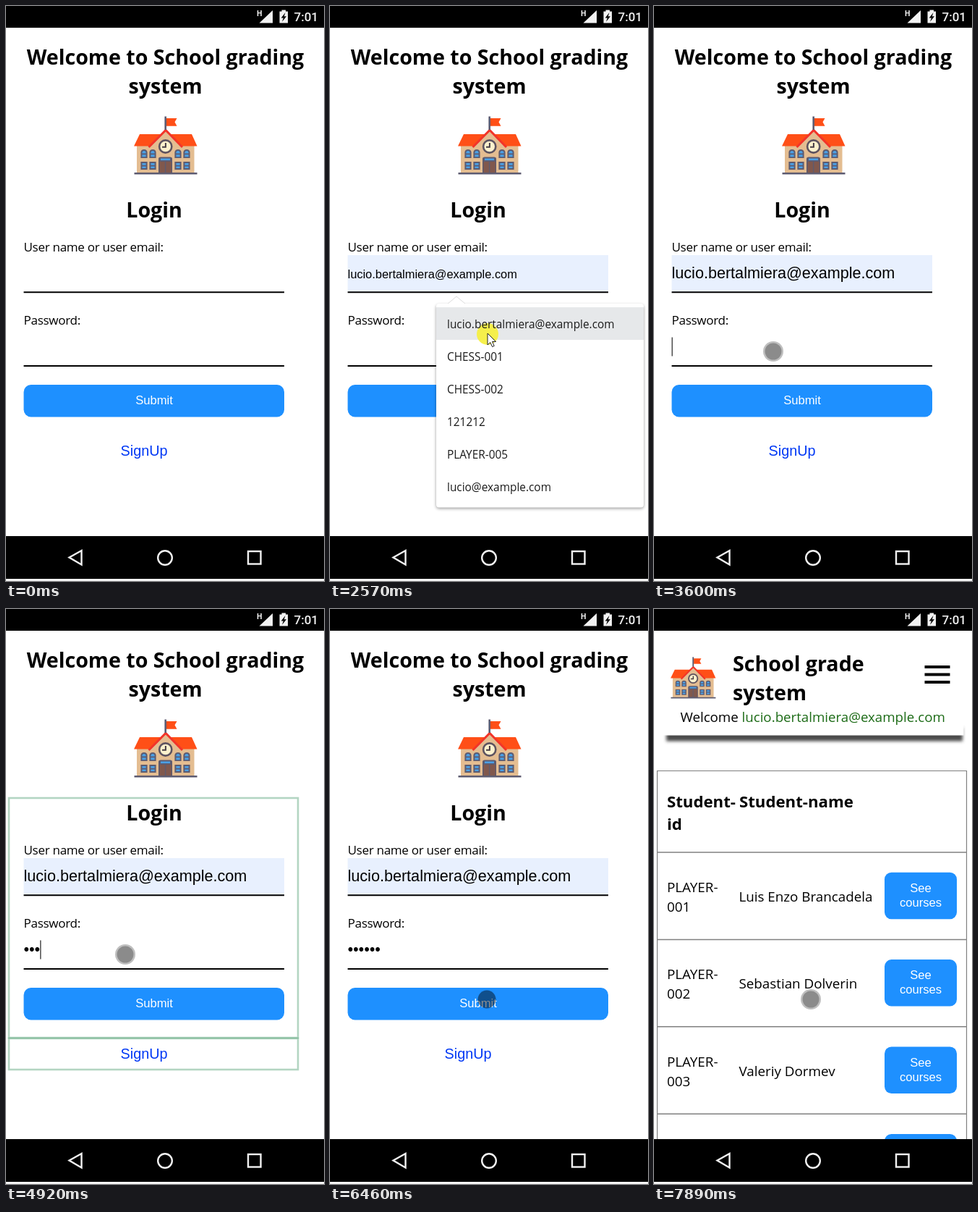
Animation, 440 px wide and 794 px high, one loop 8 s. Source, as an HTML page:

```html
<!DOCTYPE html>
<html lang="en">
<head>
<meta charset="utf-8">
<title>School grading login</title>
<style>
  html, body { margin: 0; width: 100%; height: 100%; overflow: hidden; background: #fff; }
  svg { display: block; width: 440px; height: 794px; }
  text { white-space: pre; }
  .ui { font-family: "Open Sans", "Noto Sans", sans-serif; fill: #000; }
  .bold { font-weight: 700; font-size: 28.6px; }
  .mid { text-anchor: middle; }
  .label { font-size: 17px; letter-spacing: -.28px; }
  .item { font-size: 15.4px; fill: #1b1b1b; }
  .cell { font-size: 18.8px; }
  .arial { font-family: "Liberation Sans", Arial, sans-serif; }
  .btn { font-size: 16.6px; fill: #fff; text-anchor: middle; }
  .flash rect { fill: none; stroke: #2e8b57; stroke-width: 2.6; stroke-opacity: .36; }
</style>
</head>
<body>
<svg viewBox="0 0 440 794" xmlns="http://www.w3.org/2000/svg">
  <defs>
    <filter id="soft" x="-10%" y="-60%" width="120%" height="240%"><feGaussianBlur stdDeviation="2.3"/></filter>
    <filter id="haze" x="-5%" y="-5%" width="110%" height="110%"><feGaussianBlur stdDeviation="2"/></filter>
    <g id="pane">
      <path d="M-4.6 6V-1.5Q-4.6 -6 0 -6T4.6 -1.5V6Z" fill="#5d5b70"/>
      <path d="M-2.6 -.6V-1.5Q-2.6 -4 0 -4T2.6 -1.5V-.6ZM-2.6 1.2H2.6V4.2H-2.6Z" fill="#4aa0e6"/>
    </g>
    <g id="pane2">
      <rect x="-4.6" y="-5.5" width="9.2" height="11" fill="#5d5b70"/>
      <path d="M-2.6 -3.5H2.6V-.7H-2.6ZM-2.6 1H2.6V3.6H-2.6Z" fill="#4aa0e6"/>
    </g>
    <g id="school">
      <rect x="181" y="190" width="79.500" height="41" fill="#e4bd91"/>
      <path d="M185 177H257L264.500 193.500H177Z" fill="#ff4f17"/>
      <path d="M198 195L221 172L243.500 195Z" fill="#e4bd91"/>
      <path d="M197.500 195L221 171.500L244 195" fill="none" stroke="#f2352a" stroke-width="3"/>
      <path d="M220.700 152.500V171" stroke="#5d5b70" stroke-width="2.600"/>
      <path d="M222 155H236.500L233.500 160.300L236.500 165.700H222Z" fill="#ff4f17"/>
      <circle cx="220.700" cy="194" r="8.600" fill="#fdf1cd" stroke="#5d5360" stroke-width="2.600"/>
      <path d="M220.900 189V194.800H216" fill="none" stroke="#453c46" stroke-width="2"/>
      <g id="panes"></g>
      <path d="M211 231V211Q211 208.500 214 208.500H227Q230 208.500 230 211V231Z" fill="#5d5b70"/>
      <rect x="214" y="210.500" width="13" height="2.600" fill="#4aa0e6"/>
      <path d="M212.500 215H219.900V230H212.500ZM221.300 215H228.700V230H221.300Z" fill="#80584d"/>
      <path d="M177.500 231.300H264.500" stroke="#5d5b70" stroke-width="2.400"/>
    </g>
  </defs>

  <rect width="440" height="794" fill="#fff"/>

  <g id="login">
    <text class="ui bold mid" x="220.500" y="81">Welcome to School grading</text>
    <text class="ui bold mid" x="220.500" y="121">system</text>
    <use href="#school"/>
    <text class="ui bold mid" x="205" y="292">Login</text>
    <text class="ui label" x="24.500" y="339">User name or user email:</text>
    <text class="ui label" x="24.500" y="440">Password:</text>
    <rect id="fill" x="24.500" y="344" width="360.500" height="50" fill="#e8f0fe"/>
    <text id="email" class="arial" x="24.500" y="376"></text>
    <text id="dots" class="arial" x="24.500" y="477" font-size="21.600"></text>
    <path d="M24.500 395.300H385M24.500 497H385" stroke="#000" stroke-width="2"/>
    <rect id="caret" width="1.300" height="26" fill="#333"/>
    <rect x="24.500" y="523" width="360.500" height="44.500" rx="10" fill="#1e90ff"/>
    <text class="arial btn" x="205" y="550">Submit</text>
    <text class="arial mid" x="191" y="621" font-size="19.800" fill="#0038f5">SignUp</text>
    <g id="formFlash" class="flash">
      <rect x="4" y="261" width="400" height="331"/>
      <rect x="4" y="593" width="400" height="43"/>
    </g>
    <g id="popup">
      <rect x="147" y="413" width="287" height="281" rx="4" fill="#000" opacity=".4" filter="url(#haze)"/>
      <path d="M162 412L175 401L188 412" fill="#fff" stroke="#dcdcdc"/>
      <rect x="147" y="411" width="287" height="281.500" rx="4" fill="#fff"/>
      <rect id="hover" x="147" y="416" width="287" height="45" fill="#e6e8ea"/>
      <circle id="halo" r="15" fill="#f6f03a" opacity=".9"/>
      <g id="items"></g>
    </g>
    <path id="arrow" d="M0 0V16L3.800 12.500L6.600 18.600L9.200 17.400L6.500 11.500H11.500Z" fill="#fff" stroke="#222" stroke-width="1"/>
  </g>

  <g id="home">
    <rect x="17" y="164" width="410" height="18.500" fill="#4c4c4c" filter="url(#soft)"/>
    <rect x="10.500" y="58" width="418" height="116.500" fill="#fff"/>
    <use href="#school" transform="translate(23 66) scale(.713) translate(-177 -152)"/>
    <text class="ui bold" x="109" y="86">School grade</text>
    <text class="ui bold" x="109" y="126">system</text>
    <path d="M374.500 80H409.500M374.500 90.500H409.500M374.500 101H409.500" stroke="#000" stroke-width="4.200"/>
    <text class="ui" x="36.500" y="156" font-size="18.700">Welcome <tspan id="who" fill="#1c6b16"></tspan></text>
    <g id="table">
      <text class="ui bold" x="18" y="274" style="font-size:22.200px">Student-</text>
      <text class="ui bold" x="18" y="305" style="font-size:22.200px">id</text>
      <text class="ui bold" x="118" y="274" style="font-size:22.200px">Student-name</text>
      <g id="rows"></g>
      <path d="M4.500 740V223.500H432.500V740" fill="none" stroke="#808080" stroke-width="1.200"/>
    </g>
    <g id="tableFlash" class="flash"><rect x="4" y="223" width="428" height="530"/></g>
  </g>

  <g id="touch">
    <circle id="ring" r="14" fill="#000" opacity=".25"/>
    <circle id="core" r="11.500" fill="#000"/>
  </g>

  <rect width="440" height="30" fill="#000"/>
  <g fill="#f2f2f2">
    <path d="M369 6V23.500H350.500Z"/>
    <text x="347" y="14" font-family="Roboto, sans-serif" font-weight="700" font-size="10.500">H</text>
    <path d="M381.500 5.500H387V7.500H390V23.500H378.500V7.500H381.500Z"/>
    <path d="M386.500 9L380.700 16.500H383.800L382 21.800L388 14.200H384.800Z" fill="#000"/>
    <text x="398.500" y="21" font-family="Roboto, sans-serif" font-weight="500" font-size="17">7:01</text>
  </g>
  <rect y="732" width="440" height="59" fill="#000"/>
  <rect y="791" width="440" height="3" fill="#f6f6f6"/>
  <g fill="none" stroke="#f2f2f2" stroke-width="2.400">
    <path d="M87.500 761.500L104.500 752V771.500Z"/>
    <circle cx="220" cy="762" r="9.800"/>
    <rect x="335" y="753" width="17.500" height="17.500"/>
  </g>
</svg>
<script>
const LOOP = 8000;
const EMAIL = "lucio.bertalmiera@example.com";
const $ = id => document.getElementById(id);

const uses = [191, 203, 238, 250].map(x =>
  `<use href="#pane" x="${x}" y="204"/><use href="#pane2" x="${x}" y="220.500"/>`);
$("panes").innerHTML = uses.join("");

$("items").innerHTML = [EMAIL, "CHESS-001", "CHESS-002", "121212", "PLAYER-005", "lucio@example.com"]
  .map((s, i) => `<text class="ui item" x="162" y="${445 + 45 * i}">${s}</text>`).join("");

$("rows").innerHTML = ["Luis Enzo Brancadela", "Sebastian Dolverin", "Valeriy Dormev", ""]
  .map((name, i) => `<g transform="translate(0 ${120.4 * i})">
    <path d="M4 336H433" stroke="#808080" stroke-width="1.500"/>
    <text class="ui cell" x="18" y="391">PLAYER-</text>
    <text class="ui cell" x="18" y="418">00${i + 1}</text>
    <text class="ui cell" x="117.500" y="404">${name}</text>
    <rect x="319" y="363.700" width="100" height="64.500" rx="9.500" fill="#1e90ff"/>
    <text class="arial btn" x="369" y="391">See</text>
    <text class="arial btn" x="369" y="411">courses</text></g>`).join("");
$("who").textContent = EMAIL;

// Keys are [time, x, y]; positions between them are linear.
const touchPath = [
  [580, 253, 233], [800, 203, 275], [1000, 142, 325], [1120, 130, 352], [1320, 156, 384],
  [1639, 156, 384], [1640, 147, 395], [2900, 206, 455], [3270, 178, 462],
  [3470, 172, 468], [3600, 165, 477], [5860, 165, 477], [6190, 217, 539]
];
const mousePath = [[1850, 150, 398], [2040, 166, 402], [2230, 182, 414], [2570, 218, 453]];
const typed = [4390, 4590, 4920, 5130, 5390, 5650];

function along(path, t) {
  if (t <= path[0][0]) return path[0].slice(1);
  for (let i = 1; i < path.length; i++) {
    const [t1, x1, y1] = path[i];
    if (t < t1) {
      const [t0, x0, y0] = path[i - 1];
      const k = (t - t0) / (t1 - t0);
      return [x0 + (x1 - x0) * k, y0 + (y1 - y0) * k];
    }
  }
  return path[path.length - 1].slice(1);
}

const within = (t, a, b) => t >= a && t < b;
const show = (id, on) => $(id).setAttribute("display", on ? "inline" : "none");
const move = (id, [x, y]) => $(id).setAttribute("transform", `translate(${x} ${y})`);
const fade = (t, a, b) => Math.max(0, Math.min(1, (b - t) / (b - a)));

function caretAt(t, count) {
  if (within(t, 1850, 2230)) return [24.5, 356];
  if (within(t, 2900, 3470)) return [334.5, 356];
  if (within(t, 3470, 4060) || within(t, 4390, 6190)) return [24.5 + count * 7.56, 457.5];
  return null;
}

function draw(t) {
  const home = t >= 7010;
  show("login", !home);
  show("home", home);

  const popup = within(t, 1850, 2900);
  const mouse = along(mousePath, t);
  show("popup", popup);
  show("arrow", popup);
  show("hover", t >= 2230);
  move("halo", mouse);
  move("arrow", [mouse[0], mouse[1] - 1]);

  show("fill", t >= 2230);
  $("email").textContent = t >= 2230 ? EMAIL : "";
  $("email").setAttribute("font-size", t < 2900 ? 16.4 : 21.6);

  const count = typed.filter(k => t >= k).length;
  $("dots").textContent = "•".repeat(count);
  const caret = caretAt(t, count);
  show("caret", caret);
  if (caret) move("caret", caret);

  const formFlash = within(t, 2900, 3270) ? fade(t, 3100, 3270)
    : within(t, 4390, 6190) ? fade(t, 5860, 6190) : 0;
  $("formFlash").setAttribute("opacity", formFlash);
  show("table", t >= 7420);
  $("tableFlash").setAttribute("opacity", t >= 7420 ? fade(t, 7820, 7890) : 0);

  const pressed = within(t, 1710, 1850) || within(t, 6400, 7010);
  show("touch", t >= 580 && !popup);
  show("ring", !pressed);
  $("core").setAttribute("opacity", pressed ? .45 : .27);
  $("core").setAttribute("r", pressed ? 12.5 : 11.5);
  move("touch", along(touchPath, t));
}

const start = performance.now();
function tick() {
  draw((performance.now() - start) % LOOP);
  requestAnimationFrame(tick);
}
draw(0);
requestAnimationFrame(tick);
</script>
</body>
</html>
```
